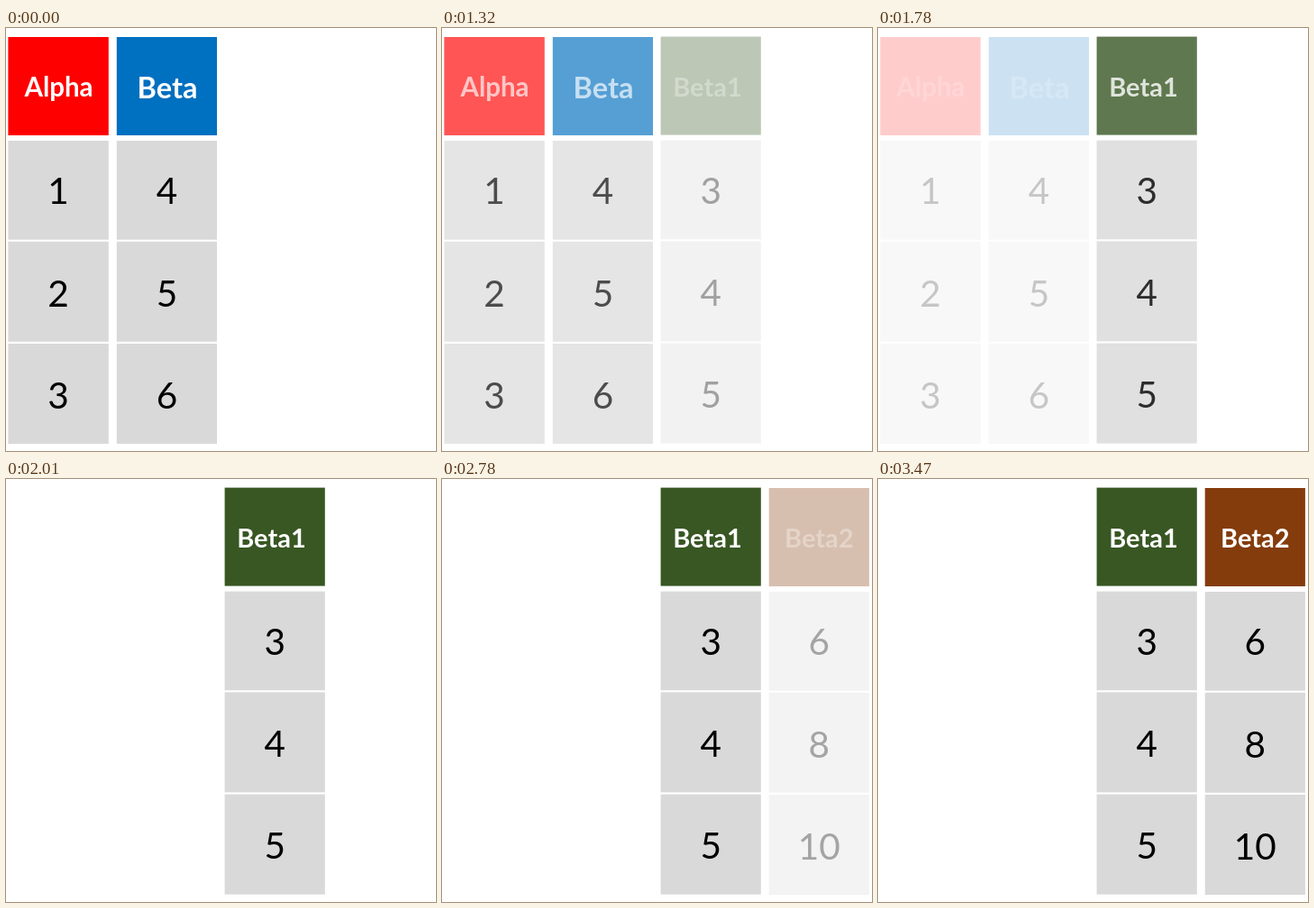
Recreate the animation shown at these times as an HTML page. Size 477x469 px, loop 4.39 s.

```html
<!DOCTYPE html>
<html lang="en">
<head>
<meta charset="utf-8">
<title>Column fade</title>
<style>
  html, body { margin: 0; width: 100%; height: 100%; overflow: hidden; background: #fff; }
  svg { display: block; }
  text { font: 40.5px Lato, sans-serif; text-anchor: middle; }
  .head { font-weight: 700; }
</style>
</head>
<body>
<svg id="stage" width="477" height="469" viewBox="0 0 477 469"></svg>
<script>
const LOOP = 4390;
const stage = document.getElementById('stage');

function add(parent, tag, attrs, label = '') {
  const el = document.createElementNS('http://www.w3.org/2000/svg', tag);
  for (const key in attrs) el.setAttribute(key, attrs[key]);
  el.textContent = label;
  parent.append(el);
  return el;
}

// top, height and text baseline of the body rows
const rows = [[125, 109.7, 195], [236.8, 111, 308.7], [350, 111, 421.6]];

function column(x, width, dy, color, title, values) {
  const group = add(stage, 'g', {});
  add(group, 'rect', { x, y: 10 + dy, width, height: 109, fill: color });
  const head = add(group, 'text', { x: title.x, y: title.y, fill: '#fff', class: 'head' }, title.label);
  head.style.fontSize = title.size + 'px';
  rows.forEach(([y, height, base], i) => {
    add(group, 'rect', { x, y: y + dy, width, height, fill: '#d9d9d9' });
    add(group, 'text', { x: x + width / 2, y: base + dy, fill: '#000' }, values[i]);
  });
  return group;
}

const alpha = column(2.4, 111.4, 0, '#ff0000', { label: 'Alpha', x: 58.5, y: 76, size: 29.5 }, [1, 2, 3]);
const beta = column(122.8, 111.2, 0, '#0070c0', { label: 'Beta', x: 179, y: 78, size: 32.5 }, [4, 5, 6]);
const beta1 = column(242.6, 111.2, -0.4, '#385723', { label: 'Beta1', x: 294.5, y: 76, size: 29 }, [3, 4, 5]);
const beta2 = column(362.7, 111.2, 0, '#843c0c', { label: 'Beta2', x: 418.3, y: 76, size: 29 }, [6, 8, 10]);

// Linear fade that advances in discrete steps
function fade(t, start, origin, step, first, last) {
  if (t < start) return 0;
  const k = Math.max(0, Math.floor((t - origin) / step));
  return k >= last ? 1 : first + 0.078 * k;
}

// Inherited fill opacity makes each cell and its text fade separately
const show = (group, opacity) => group.setAttribute('fill-opacity', opacity);

const begin = performance.now();
function draw(now) {
  const t = Math.max(0, now - begin) % LOOP;
  const swap = fade(t, 1000, 1009, 77, 0.02, 13);
  show(alpha, 1 - swap);
  show(beta, 1 - swap);
  show(beta1, swap);
  show(beta2, fade(t, 2550, 2550, 76.6, 0.09, 12));
  requestAnimationFrame(draw);
}
draw(begin);
</script>
</body>
</html>
```
